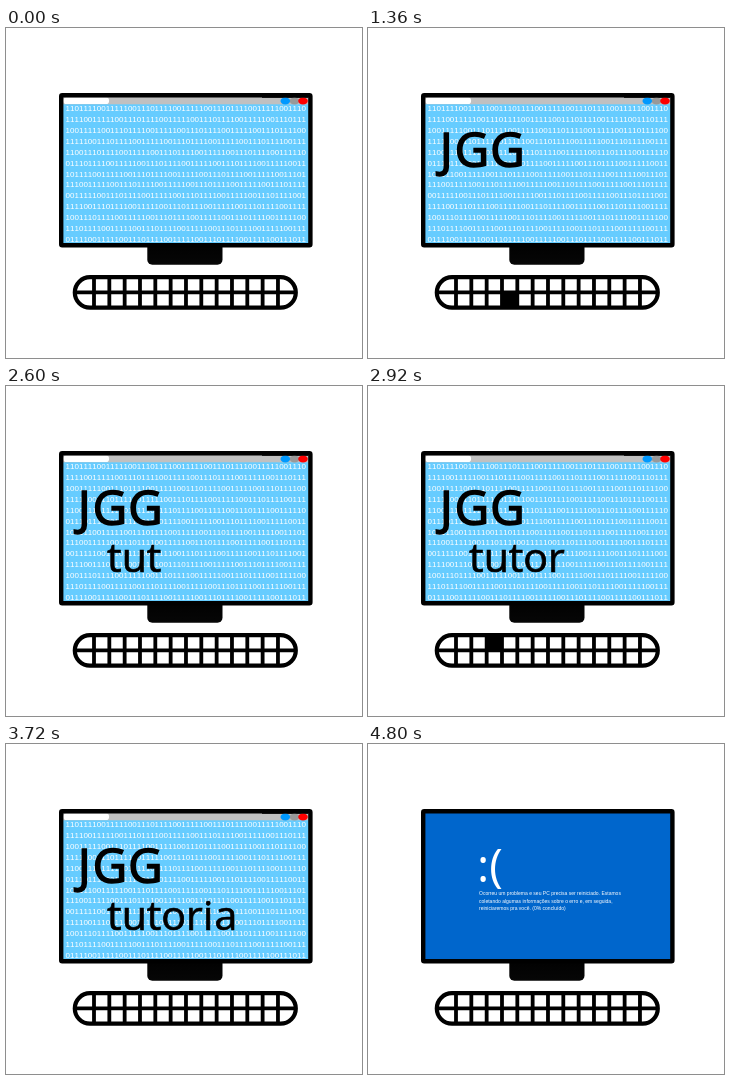
Recreate the animation shown at these times as an HTML page. Size 356 by 330 pixels, loop 5040 ms.

```html
<!DOCTYPE html>
<html lang="pt">
<head>
<meta charset="utf-8">
<title>Tutoria</title>
<style>
  html, body { margin: 0; width: 100%; height: 100%; overflow: hidden; background: #fff; }
  svg { display: block; width: 100vw; height: 100vh; }
  .bits { font: 8px "Liberation Sans", Arial, sans-serif; font-kerning: none; fill: #fff; }
  .word { font-family: "Open Sans", "Noto Sans", sans-serif; }
  .title { font-size: 47px; stroke: #000; stroke-width: 1.6; }
  .sub { font-size: 41px; stroke: #000; stroke-width: .7; }
  .heart { font-size: 41.5px; font-style: italic; letter-spacing: 2px; fill: #f00; stroke: #f00; }
  .face { font-size: 46px; fill: #fff; }
  .error { font: 5.02px "Liberation Sans", Arial, sans-serif; fill: #fff; }
  [data-from] { visibility: hidden; }
</style>
</head>
<body>
<svg viewBox="0 0 356 330">
  <defs>
    <linearGradient id="metal" x2="0" y2="1">
      <stop stop-color="#000"/><stop offset="1" stop-color="#060606"/>
    </linearGradient>
    <clipPath id="board"><rect x="68.8" y="249.2" width="221" height="30.4" rx="15.2"/></clipPath>
  </defs>

  <rect x="141.3" y="212" width="75.2" height="24.8" rx="5" fill="url(#metal)"/>
  <rect x="55" y="67" width="249" height="150" fill="#6cf"/>
  <g class="bits" id="bits"></g>
  <rect x="57" y="69" width="246" height="7.3" fill="#c0c0c0"/>
  <rect x="57.5" y="69.5" width="45.5" height="6.5" rx="2.8" fill="#fff"/>
  <rect x="256" y="69" width="46" height=".8"/>
  <ellipse cx="288.5" cy="73" rx="4.8" ry="3.4" fill="#999"/>
  <ellipse cx="279.3" cy="73" rx="4.8" ry="3.4" fill="#09f"/>
  <ellipse cx="297" cy="73" rx="4.8" ry="3.4" fill="#f00"/>

  <g class="word" id="words">
    <text class="heart" x="237.5" y="188" data-from="4360" data-to="4800">&lt;3</text>
  </g>

  <g data-from="4800" data-to="5040">
    <rect x="56" y="68" width="248" height="149" fill="#06c"/>
    <text class="word face" x="109" y="138">:(</text>
    <g class="error">
      <text x="111" y="151.4">Ocorreu um problema e seu PC precisa ser reiniciado. Estamos</text>
      <text x="111" y="159">coletando algumas informações sobre o erro e, em seguida,</text>
      <text x="111" y="166.4">reiniciaremos pra você. (0% concluído)</text>
    </g>
  </g>
  <rect x="55.2" y="67.2" width="249.2" height="150.1" rx="1" fill="none" stroke="#000" stroke-width="4.4"/>

  <g id="keys" clip-path="url(#board)"></g>
  <path id="grid" stroke="#000" stroke-width="3.8"/>
  <rect x="68.8" y="249.2" width="221" height="30.4" rx="15.2" fill="none" stroke="#000" stroke-width="4.2"/>
</svg>
<script>
  const LOOP = 5040, CRASH = 4800, PITCH = 15.33, LEFT = 88;
  const TOP = 249.2, MIDDLE = 264.4, ROW = MIDDLE - TOP;
  const $ = id => document.getElementById(id);

  function add(parent, tag, attrs, text = '') {
    const el = document.createElementNS('http://www.w3.org/2000/svg', tag);
    for (const name in attrs) el.setAttribute(name, attrs[name]);
    el.textContent = text;
    parent.append(el);
  }

  // One repeating bit string, wrapped at 54 digits per line.
  const bits = '11101111001111100'.repeat(50);
  for (let row = 0; row < 13; row++) {
    const start = 1 + row * 54;
    add($('bits'), 'text', { x: 59.6, y: 83 + row * 10.92 }, bits.slice(start, start + 54));
  }

  const columns = Array.from({ length: 13 }, (_, i) => `M${LEFT + i * PITCH} ${TOP}v${2 * ROW}`);
  $('grid').setAttribute('d', columns.join('') + `M69 ${MIDDLE}H290`);

  function press(column, row, from, to) {
    add($('keys'), 'rect', {
      x: LEFT + column * PITCH, y: TOP + row * ROW, width: PITCH + (column > 11 ? 8 : 0), height: ROW,
      'data-from': from, 'data-to': to
    });
  }

  function letter(text, style, x, y, from) {
    add($('words'), 'text', { class: style, x, y, 'data-from': from, 'data-to': CRASH }, text);
  }

  // letter, x, key column, key row
  [['J', 72, 8, 0], ['G', 86.8, 3, 1], ['G', 122.3, 3, 1]].forEach(([char, x, column, row], i) => {
    const from = 160 + i * 600;
    letter(char, 'title', x, 138.5, from);
    press(column, row, from, from + 280);
  });

  const typed = [[4, 0], [7, 0], [4, 0], [10, 0], [2, 0], [9, 0], [0, 1]];
  const starts = [101, 115.7, 140.7, 155.2, 180, 197, 208.6];
  [...'tutoria'].forEach((char, i) => {
    const from = 1960 + i * 240;
    letter(char, 'sub', starts[i], 186, from);
    press(...typed[i], from, from + 160);
  });
  press(12, 1, 3560, 3720);

  const timed = [...document.querySelectorAll('[data-from]')].map(el => ({
    el, from: +el.dataset.from, to: +el.dataset.to
  }));
  const begin = performance.now();
  function draw() {
    const time = (performance.now() - begin) % LOOP;
    for (const { el, from, to } of timed)
      el.style.visibility = time >= from && time < to ? 'visible' : 'hidden';
    requestAnimationFrame(draw);
  }
  draw();
</script>
</body>
</html>
```
